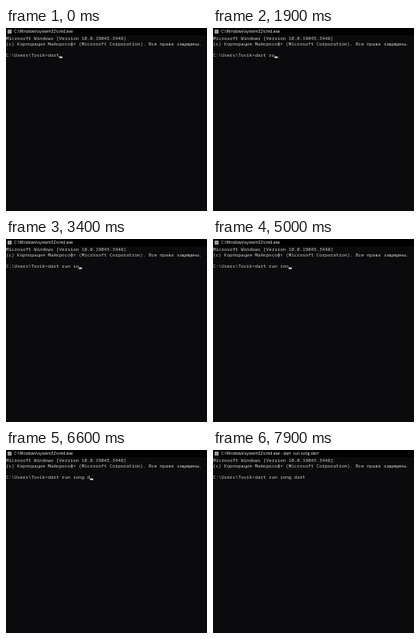
Animation, 252 px wide and 229 px high, one loop 8 s. Source, as an HTML page with a canvas:

```html
<!DOCTYPE html>
<html lang="ru">
<head>
<meta charset="utf-8">
<title>Console</title>
<style>
  html, body { margin: 0; overflow: hidden; background: #0b0a0c; }
  canvas { display: block; }
</style>
</head>
<body>
<canvas id="stage" width="252" height="229"></canvas>
<script>
const ctx = document.getElementById('stage').getContext('2d');
const LOOP = 8000, LAUNCH = 7900;
const CELL = 3.51, ROW = 7;
const BLINK = 530, FIRST_BLINK = 200;
const PROMPT = 'C:\\Users\\Tovik>';
const START = 'dart', REST = ' run song.dart';
const TITLE = 'C:\\Windows\\system32\\cmd.exe';

// one key press for each character of REST
const keys = [1000, 1300, 1900, 2000, 2200, 3000, 3400, 5000, 5100, 6300, 6600, 6800, 7100, 7200];

const keyBetween = (from, to) => keys.some(key => key >= from && key < to);
const blinkTime = n => Math.round((FIRST_BLINK + n * BLINK) / 100) * 100;

// The blink timer toggles the cursor; a key press shows it until the next tick.
function cursorVisible(t) {
  let on = true, last = 0;
  for (let n = 0; blinkTime(n) <= t; n++) {
    on = !(on || keyBetween(last, blinkTime(n)));
    last = blinkTime(n);
  }
  return on || keyBetween(last, t + 1);
}

function rect(color, x, y, w, h) {
  ctx.fillStyle = color;
  ctx.fillRect(x, y, w, h);
}

function text(str, x, y, font, color) {
  ctx.font = font;
  ctx.fillStyle = color;
  ctx.fillText(str, x, y);
}

function line(str, row) {
  text(str, 0, 15 + row * ROW, '5.85px "Noto Sans Mono", "Liberation Mono", monospace', '#ccc');
}

function draw(now) {
  const t = now % LOOP;
  const typed = START + REST.slice(0, keys.filter(key => key <= t).length);
  const title = t < LAUNCH ? TITLE : TITLE + ' - dart  run song.dart';

  rect('#0b0a0c', 0, 0, 252, 229);
  rect('#000', 0, 0, 252, 9);
  rect('#999', 2, 2, 5, 5);
  text(title, 10.3, 6, '5.05px "Open Sans", "Noto Sans", sans-serif', '#fff');

  line('Microsoft Windows [Version 10.0.19045.3448]', 0);
  line('(c) Корпорация Майкрософт (Microsoft Corporation). Все права защищены.', 1);
  line(PROMPT + typed, 3);
  if (cursorVisible(t)) rect('#f2f2f2', (PROMPT + typed).length * CELL, 35.7, 4, 1.8);

  requestAnimationFrame(draw);
}
requestAnimationFrame(draw);
</script>
</body>
</html>
```
